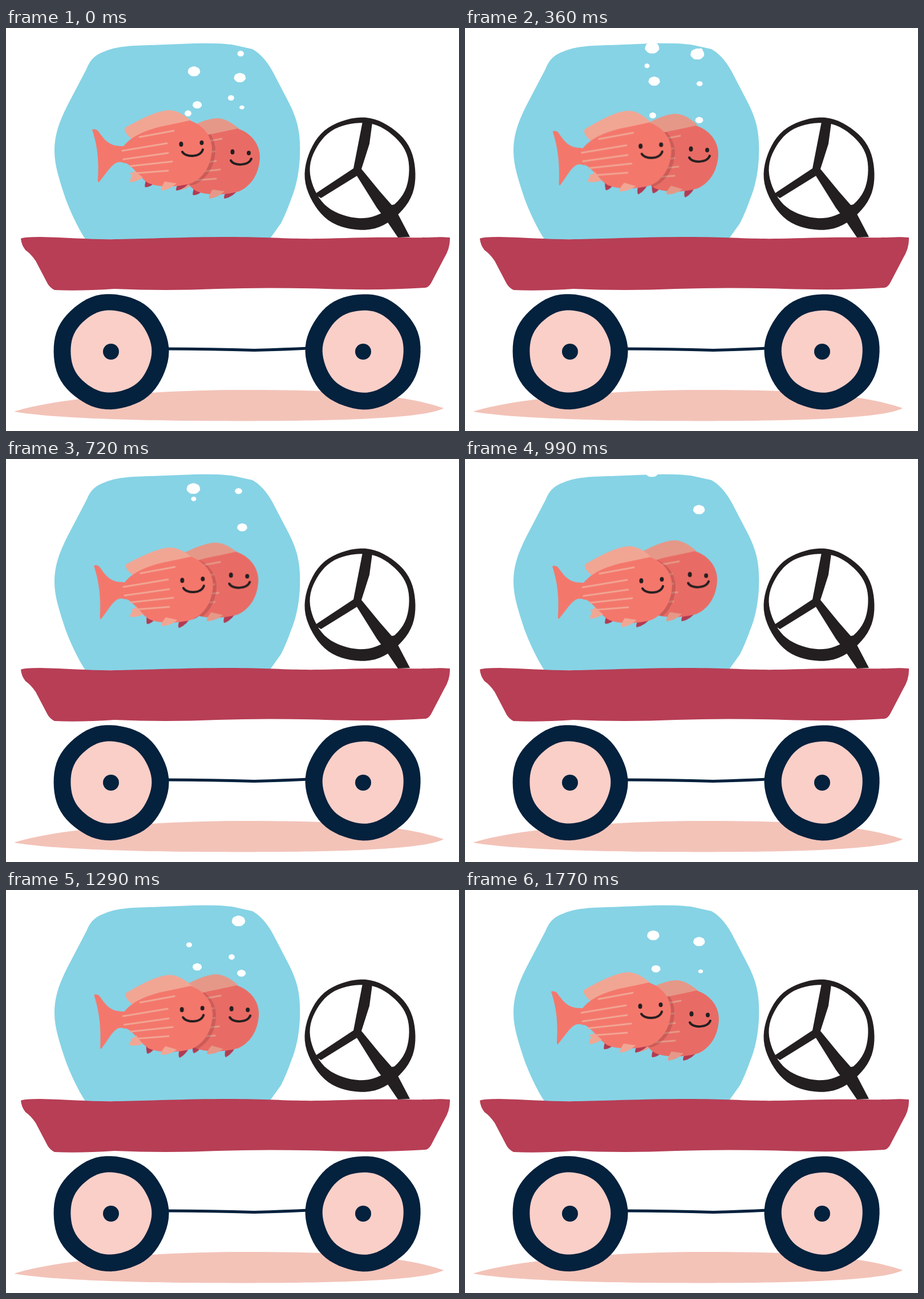
An HTML page that plays this animation: 794x706 px, repeating every 1.8 s.

```html
<!DOCTYPE html>
<html lang="en">
<head>
<meta charset="utf-8">
<title>Two fish on a wagon</title>
<style>
  html, body { margin: 0; width: 100%; height: 100%; overflow: hidden; background: #fff; }
  svg { display: block; width: 100%; height: 100%; }

  .front { --body: #f4776c; --light: #f1a694; animation: sink .9s cubic-bezier(.37,0,.63,1) infinite alternate; }
  .back { --body: #e86c65; --light: #e69888; animation: rise .9s cubic-bezier(.37,0,.63,1) infinite alternate; }
  @keyframes sink { to { transform: translate(2px, 10px); } }
  @keyframes rise { from { transform: translate(84px, 14px); } to { transform: translate(81px, -1px); } }

  .skin { fill: var(--body); }
  .light { fill: var(--light); }
  .dark { fill: #b23a53; }
  .stripes { fill: none; stroke: var(--light); stroke-width: 3; stroke-linecap: round; }
  .face { fill: #231f20; }
  .line { fill: none; stroke: #231f20; stroke-width: 4; stroke-linecap: round; }

  /* fins and tail beat twice per loop */
  .fin { animation: fin .9s ease-in-out infinite; transform-origin: var(--o); }
  @keyframes fin {
    0%, 10%, 97%, 100% { transform: none; }
    30%, 67% { transform: rotate(var(--a)); }
  }
  .tail { animation: tail .9s ease-in-out infinite; transform-origin: 205px 222px; }
  @keyframes tail {
    0%, 10%, 97%, 100% { transform: none; }
    30%, 67% { transform: scale(.95, 1.03) rotate(-1deg); }
  }
  .dorsal { animation: dorsal .9s ease-in-out infinite; transform-origin: 265px 187px; }
  @keyframes dorsal {
    0%, 100% { transform: none; }
    30% { transform: scaleY(1.1); }
    62% { transform: scaleY(.91); }
  }

  .open { animation: open 1.8s step-end infinite; }
  .shut { animation: shut 1.8s step-end infinite; }
  @keyframes open { 0%, 91.6% { opacity: 1; } 80% { opacity: 0; } }
  @keyframes shut { 0%, 91.6% { opacity: 0; } 80% { opacity: 1; } }

  #bubbles { fill: #fff; }
  .slow { animation: slow 1.8s linear infinite; }
  .fast { animation: fast 1.8s linear infinite; }
  .early { animation: early 1.8s step-end infinite; }
  @keyframes slow {
    0% { translate: 0 180px; scale: .55; }
    25% { translate: 7px 128px; scale: .75; }
    52% { translate: 0 72px; scale: .99; }
    87%, 100% { translate: -2px 0; scale: 1.25; }
  }
  @keyframes fast {
    0% { translate: 0 175px; scale: 1.05; }
    42%, 100% { translate: var(--drift) 0; scale: .55; }
  }
  @keyframes early { 0% { opacity: 1; } 37% { opacity: 0; } }
</style>
</head>
<body>
<svg viewBox="0 0 794 706" preserveAspectRatio="none">
  <defs>
    <path id="body" d="M198 207L206 207C220 190 240 181 270 173Q300 167 322 162C346 170 361 190 361 212C360 240 347 262 325 272C300 279 270 280 250 272C235 264 222 240 208 236L198 234Z"/>
    <g id="fish">
      <path class="light dorsal" d="M222 196C212 188 204 178 210 174C230 163 262 145 285 144C300 144 312 152 324 162C300 178 250 180 222 196Z"/>
      <path class="dark fin" style="--o:252px 270px;--a:-17deg" d="M246 264L259 272Q253 279 244 279Q242 277 246 264Z"/>
      <path class="dark fin" style="--o:311px 272px;--a:-17deg" d="M303 270L324 268Q314 282 299 285Q296 283 303 270Z"/>
      <use href="#body" class="skin"/>
      <path class="stripes" d="M234 191L294 180M204 215L282 202M206 230L284 219M217 242L291 234M219 255L284 250"/>
      <path class="light fin" style="--o:232px 256px;--a:16deg" d="M225 250L240 262Q230 269 218 270Q215 268 225 250Z"/>
      <path class="light fin" style="--o:288px 270px;--a:8deg" d="M278 269L299 272Q288 283 273 285Q269 283 278 269Z"/>
    </g>
    <clipPath id="behind"><use href="#body" class="back"/></clipPath>
  </defs>

  <path fill="#f3c3b8" d="M14 672C90 648 260 634 420 634S690 640 767 666C740 682 610 687 500 688S120 690 14 672Z"/>
  <path fill="#86d3e5" d="M139 370C126 350 112 320 104 298C95 270 84 240 85 212C86 185 93 165 108 135L141 72C148 54 158 46 173 41Q190 33 225 31L330 27Q385 26 405 31L432 37Q455 50 472 85L497 133C508 155 514 175 515 200C517 240 510 275 500 299Q492 322 482 342L462 370Z"/>

  <g id="bubbles"></g>

  <g class="back">
    <g data-fish></g>
    <g transform="translate(-84 -14)">
      <g class="face open">
        <ellipse cx="397" cy="217" rx="3.5" ry="4.5"/>
        <ellipse cx="425.5" cy="219" rx="3.5" ry="4"/>
      </g>
      <path class="line shut" style="stroke-width:3" d="M393 217C393 207 399 206 400 217M421 219C422 209 428 209 428 219"/>
      <path class="line" d="M394 232C399 242 425 242 430 229"/>
    </g>
  </g>
  <g clip-path="url(#behind)">
    <g transform="translate(6 2)" opacity=".26"><use href="#body" class="front" fill="#7a3038"/></g>
  </g>
  <g class="front">
    <path class="skin tail" d="M151 178Q157 176 161 180C172 195 180 207 203 207L212 222L208 237C190 228 181 249 163 270Q161 271 161 266C163 235 161 208 151 178Z"/>
    <g data-fish></g>
    <ellipse class="face" cx="307" cy="203.5" rx="3.5" ry="4.5"/>
    <ellipse class="face" cx="343" cy="201" rx="3.5" ry="4"/>
    <path class="line" d="M309 217C315 227 341 227 345 213"/>
  </g>

  <g fill="#231f20">
    <path id="steering" fill-rule="evenodd"/>
    <path d="M625 164L642 166L637 203L623 247L655 286L676 310L682 309L685 322L708 366L687 367L668 339L650 315L615 259L552 298L541 291L609 246Z"/>
  </g>

  <path fill="#b73e55" d="M26 369Q30 366 60 366C110 367 150 371 200 370S320 366 390 366S500 370 550 369S640 366 700 367S750 365 778 367Q779 385 768 403L745 447Q741 454 735 455Q660 460 560 457T370 457Q280 461 190 457Q130 461 85 459Q77 455 73 448L52 408Q44 396 34 389Q27 380 26 369Z"/>

  <path d="M280 562Q360 562 435 564.5Q490 563 530 561" fill="none" stroke="#04213d" stroke-width="4.8"/>
  <g id="wheels"></g>
</svg>
<script>
  const NS = 'http://www.w3.org/2000/svg';
  const $ = id => document.getElementById(id);

  function add(parent, tag, attrs) {
    const el = document.createElementNS(NS, tag);
    for (const key in attrs) el.setAttribute(key, attrs[key]);
    return parent.appendChild(el);
  }

  // Ellipse with a slightly uneven, hand-cut edge
  function ring(cx, cy, rx, ry = rx, wobble = .006) {
    const points = Array.from({ length: 72 }, (_, i) => {
      const a = i * Math.PI / 36;
      const k = 1 + wobble * Math.sin(7 * a + cx);
      return `${cx + rx * k * Math.cos(a)} ${cy + ry * k * Math.sin(a)}`;
    });
    return `M${points.join('L')}Z`;
  }

  $('steering').setAttribute('d', ring(621, 255.5, 97, 98.5) + ring(620, 249.5, 87, 83.5));

  for (const cx of [184, 626]) {
    add($('wheels'), 'path', { d: ring(cx, 567, 101), fill: '#04213d' });
    add($('wheels'), 'path', { d: ring(cx, 566.5, 71, 72), fill: '#facfc8' });
    add($('wheels'), 'circle', { cx, cy: 567, r: 14, fill: '#04213d' });
  }

  for (const slot of document.querySelectorAll('[data-fish]'))
    for (const part of $('fish').children) slot.append(part.cloneNode(true));

  // Each bubble leaves the fish at its own time (ms) and x
  function bubble(kind, x, start, { size = 1, drift = 0, early = false } = {}) {
    const holder = add($('bubbles'), 'g', { transform: `translate(${x} 0)`, class: early ? 'early' : '' });
    const [rx, ry] = kind === 'slow' ? [11, 8.8] : [6, 5.3];
    const delay = start > 0 ? start - 1800 : start;
    add(holder, 'path', {
      d: ring(0, 0, rx * size, ry * size, .02),
      class: kind,
      style: `animation-delay:${delay}ms;--drift:${drift}px`
    });
  }

  bubble('slow', 329, -391);
  bubble('slow', 329, 900);
  bubble('slow', 408, 200);
  bubble('slow', 408, 995);
  bubble('slow', 408, 1447, { size: .55 });
  bubble('fast', 321, 950);
  bubble('fast', 329, 267);
  bubble('fast', 383, 1042, { drift: 38 });
  bubble('fast', 319, -109, { early: true });
  bubble('fast', 383, -226, { drift: 38, early: true });
  bubble('fast', 383, -561, { drift: 38, size: 1.4, early: true });
</script>
</body>
</html>
```
